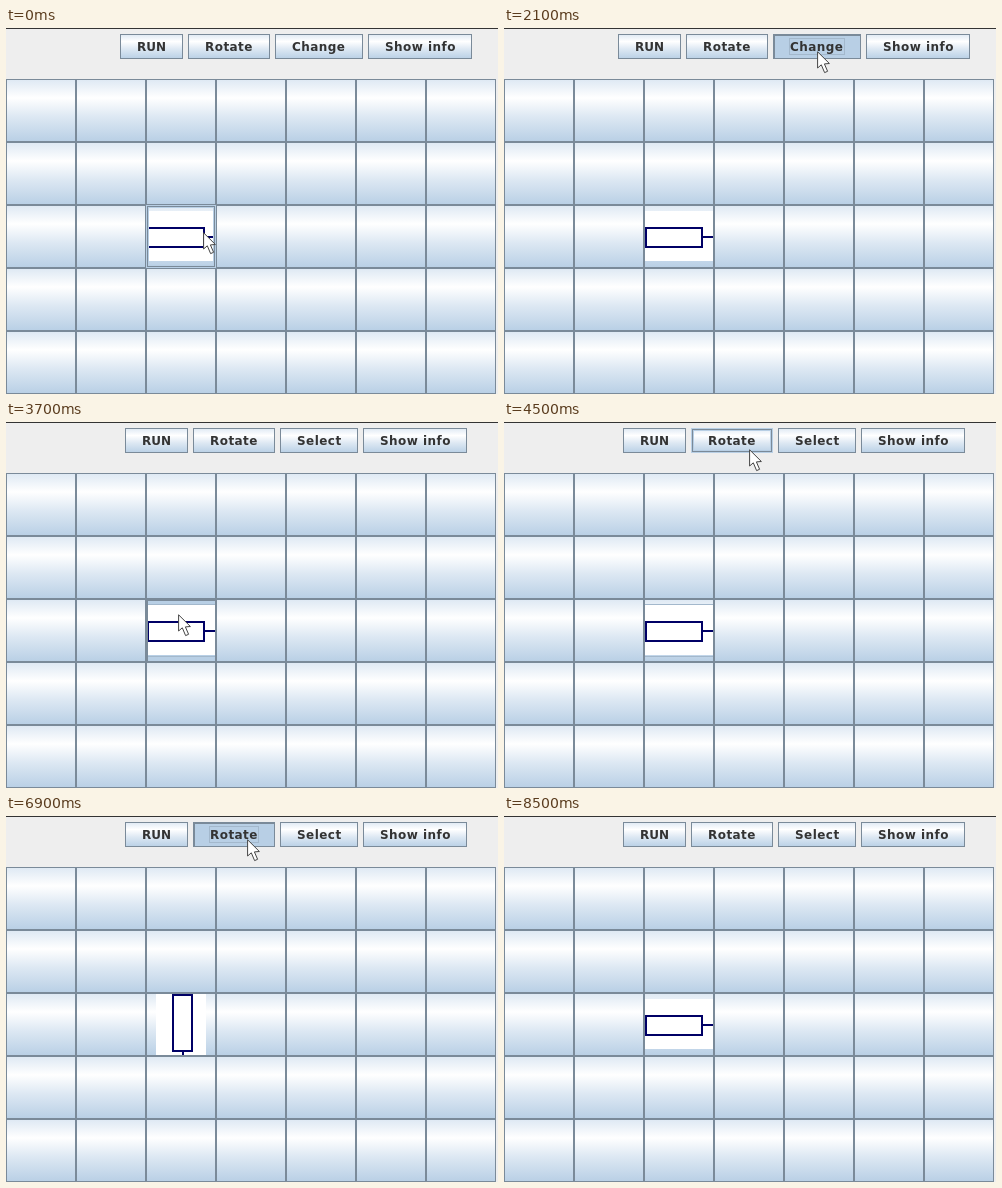
Animation, 492 px wide and 366 px high, one loop 8.8 s. Source, as an HTML page:

```html
<!DOCTYPE html>
<html lang="en">
<head>
<meta charset="utf-8">
<title>Grid editor</title>
<style>
  html, body { margin: 0; width: 100%; height: 100%; overflow: hidden; background: #eee; }
  body { position: relative; border-top: 1px solid #333; box-sizing: border-box; }
  #stage { position: absolute; left: 0; top: -1px; width: 492px; height: 366px; overflow: hidden; }
  .btn {
    position: absolute; overflow: hidden;
    background: linear-gradient(#dde8f3, #fff 30%, #dde8f3 60%, #b8cfe5);
  }
  .btn::after { content: ""; position: absolute; inset: 0; box-shadow: inset 0 0 0 1px #7a8a99; }
  .hover::after {
    box-shadow: inset 0 0 0 1px #b8cfe5, inset 0 0 0 2px #7a8a99, inset 0 0 0 3px #b8cfe5;
  }
  .down { background: #b8cfe5; }
  .down::after { box-shadow: inset 2px 2px #7a8a99, inset -1px -1px #7a8a99; }
  .tool { top: 6px; height: 25px; }
  .label {
    position: absolute; left: 17px; top: 6px; white-space: pre;
    font: bold 12px/14px "DejaVu Sans", sans-serif; letter-spacing: .45px; color: #333;
  }
  .caps { letter-spacing: 0; }
  .ring { position: absolute; inset: 4px 16px; border: 1px solid #a3b8cc; visibility: hidden; }
  .cell .ring { inset: 5px -1px; }
  .focus .ring { visibility: visible; }
  svg { position: absolute; left: 0; top: 0; }
</style>
</head>
<body>
<div id="stage"></div>
<script>
const LOOP = 8800;
const stage = document.getElementById("stage");

// Cursor path: start time, then one point per 100 ms
const PATH = [
  [0, [197, 204]],
  [500, [203, 196], [216, 176], [238, 142], [263, 104], [284, 72], [299, 48], [308, 33], [312, 26], [313, 23]],
  [2900, [306, 32], [281, 66], [240, 118], [200, 160], [177, 186], [172, 192]],
  [4200, [186, 180], [230, 126], [266, 62], [245, 27], [242, 24], [241, 23]],
  [7600, [196, 14], [158, 8], [142, -2]],
  [8100, [76, -8], [-40, -40]]
];
const PRESSES = [
  [2100, 2400, "mode"], [3700, 3900, "part"], [4900, 5100, "rotate"],
  [5500, 5700, "rotate"], [6100, 6200, "rotate"], [6900, 7000, "rotate"]
];
const BLUR = 8500;

function add(parent, cls, html = "") {
  const el = document.createElement("div");
  el.className = cls;
  el.innerHTML = html;
  parent.append(el);
  return el;
}

function place(b, x, y, w, h) {
  Object.assign(b, { x, y, w, h });
  Object.assign(b.el.style, { left: x + "px", top: y + "px", width: w + "px", height: h + "px" });
}

function makeTool(text, width) {
  const el = add(stage, "btn tool", `<div class="ring"></div><div class="label">${text}</div>`);
  const label = el.querySelector(".label");
  if (text === "RUN") label.classList.add("caps");
  return { el, label, width };
}

const tools = {
  run: makeTool("RUN", 63),
  rotate: makeTool("Rotate", 82),
  mode: makeTool("Change", 88),
  info: makeTool("Show info", 104)
};

function setMode(text, width) {
  const { mode } = tools;
  if (mode.label.textContent === text && mode.x !== undefined) return;
  mode.label.textContent = text;
  mode.width = width;
  const row = Object.values(tools);
  let x = 290 - (row.reduce((sum, b) => sum + b.width, 15)) / 2;
  for (const b of row) {
    place(b, x, 6, b.width, 25);
    x += b.width + 5;
  }
}

let part;
for (let r = 0; r < 5; r++) {
  for (let c = 0; c < 7; c++) {
    const b = { el: add(stage, "btn cell") };
    place(b, c * 70, 51 + r * 63, 70, 63);
    if (r === 2 && c === 2) part = b;
  }
}

const INK = `fill="none" stroke="#006" stroke-width="2"`;
part.el.innerHTML = `<div class="ring"></div>
  <svg width="70" height="63" shape-rendering="crispEdges">
    <g id="flat"><rect y="6" width="70" height="50" fill="#fff"/><path d="M2 23H58V42H2ZM58 32H70" ${INK}/></g>
    <g id="tall"><rect x="10" width="50" height="63" fill="#fff"/><path d="M27 2H46V58H27ZM37 58V63" ${INK}/></g>
  </svg>`;
const flat = document.getElementById("flat");
const tall = document.getElementById("tall");

const cursor = add(stage, "", `<svg width="16" height="26">
  <path d="M.6 .8V17L4.3 13.8L7.6 21.6L10.6 20.3L7.4 12.9L12.4 12.5Z"
    fill="#fff" stroke="#444" stroke-width="1" stroke-linejoin="round"/></svg>`);
cursor.style.cssText = "position:absolute;left:0;top:0;width:16px;height:26px";

const buttons = { ...tools, part };

function cursorAt(t) {
  const [start, ...points] = PATH.filter(leg => leg[0] <= t).pop();
  return points[Math.min(points.length - 1, Math.floor((t - start) / 100))];
}

function draw(t) {
  if (t < 2400) setMode("Change", 88);
  else setMode("Select", 78);

  const [x, y] = cursorAt(t);
  cursor.style.transform = `translate(${x}px, ${y}px)`;

  const past = PRESSES.filter(p => p[0] <= t);
  const last = past[past.length - 1];
  const held = last && t < last[1] ? last[2] : "";
  const focus = last && t < BLUR ? last[2] : "";
  const turns = past.filter(p => p[2] === "rotate" && p[1] <= t).length;

  for (const [name, b] of Object.entries(buttons)) {
    const over = x >= b.x && x < b.x + b.w && y >= b.y && y < b.y + b.h;
    b.el.classList.toggle("down", held === name);
    b.el.classList.toggle("hover", over && held !== name);
    b.el.classList.toggle("focus", focus === name);
  }
  flat.style.display = turns % 2 ? "none" : "";
  tall.style.display = turns % 2 ? "" : "none";
}

function tick() {
  draw(performance.now() % LOOP);
  requestAnimationFrame(tick);
}
tick();
</script>
</body>
</html>
```
